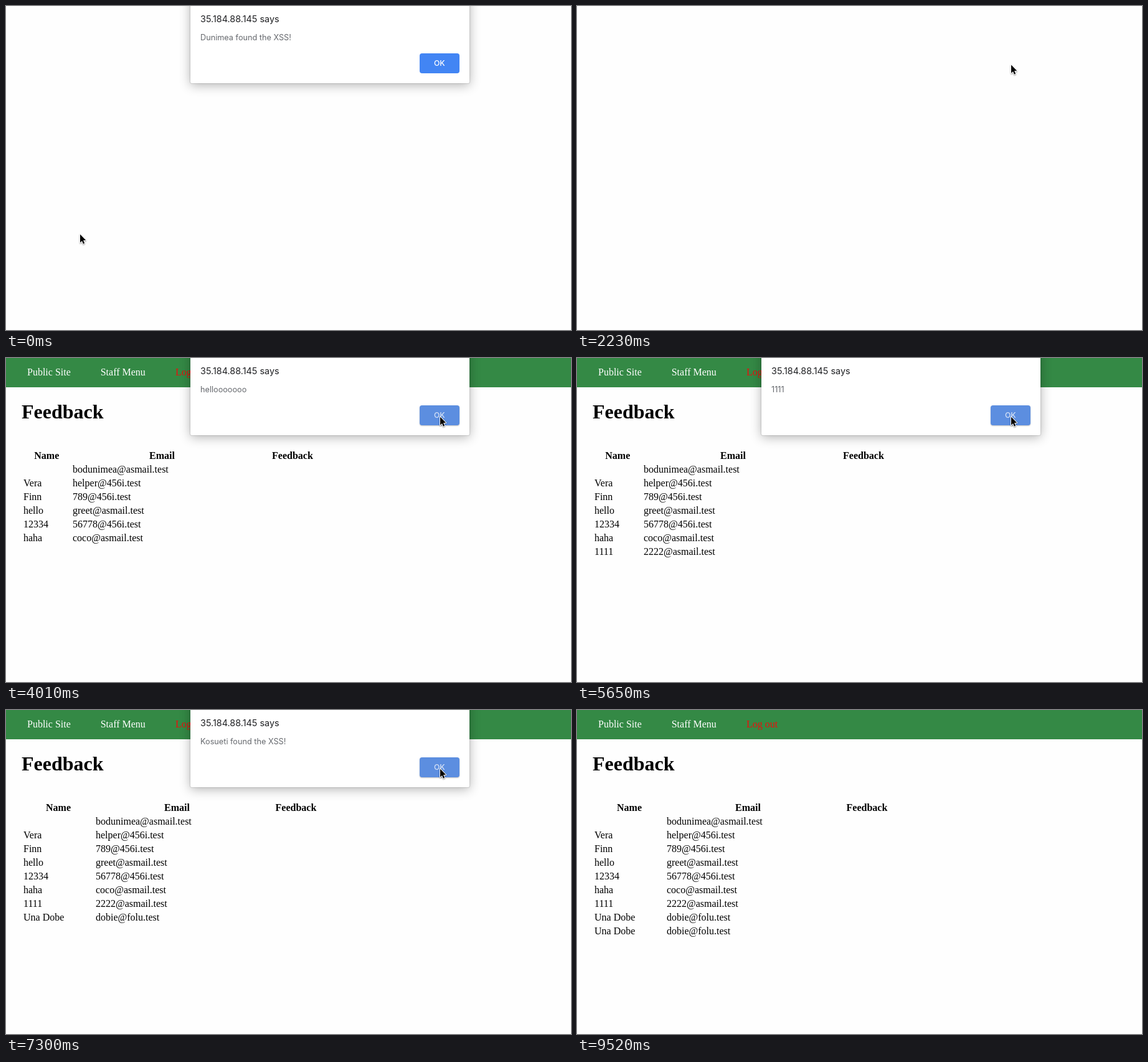
An HTML page with a canvas for the animation above (9670 ms loop, 907 by 520 pixels).

```html
<!DOCTYPE html>
<html lang="en">
<head>
<meta charset="utf-8">
<title>Feedback</title>
<style>
html, body { margin: 0; width: 100%; height: 100%; overflow: hidden; background: #fefefe; }
canvas { display: block; width: 907px; height: 520px; }
</style>
</head>
<body>
<canvas id="stage"></canvas>
<script>
const W = 907, H = 520, LOOP = 9670;
const canvas = document.getElementById('stage');
const ctx = canvas.getContext('2d');
const dpr = window.devicePixelRatio || 1;
canvas.width = W * dpr;
canvas.height = H * dpr;

const SERIF = '"Liberation Serif", serif';
const SANS = 'Inter, sans-serif';

const FOUND = 'Dunimea found the XSS!';
const ROWS = [
  ['', 'bodunimea@asmail.test'],
  ['Vera', 'helper@456i.test'],
  ['Finn', '789@456i.test'],
  ['hello', 'greet@asmail.test'],
  ['12334', '56778@456i.test'],
  ['haha', 'coco@asmail.test'],
  ['1111', '2222@asmail.test'],
  ['Una Dobe', 'dobie@folu.test'],
  ['Una Dobe', 'dobie@folu.test']
];

// start time, table rows (0 = blank page), message, button held, dialog opacity
const SCENES = [
  [0, 0, FOUND, false, 1],
  [1180, 0, FOUND, true, 1],
  [1330, 0, FOUND, true, 0],
  [1480, 0, FOUND, false, 1],
  [2080, 0, FOUND, true, 1],
  [2230, 0, FOUND, true, 0],
  [2370, 1, 'hello', false, 1],
  [2970, 1, 'hello', true, 1],
  [3270, 6, 'hellooooooo', false, 0.88],
  [3420, 6, 'hellooooooo', false, 1],
  [4010, 6, 'hellooooooo', true, 1],
  [4160, 7, '1111', false, 0.88],
  [4310, 7, '1111', false, 1],
  [5650, 7, '1111', true, 1],
  [5800, 8, 'Kosueti found the XSS!', false, 0.88],
  [5950, 8, 'Kosueti found the XSS!', false, 1],
  [7300, 8, 'Kosueti found the XSS!', true, 1],
  [7440, 9, 'Kosueti found the XSS!', true, 0.4],
  [7590, 9, '', false, 0]
];

function text(str, x, y, font, color) {
  ctx.font = font;
  ctx.fillStyle = color;
  ctx.fillText(str, x, y);
}

function box(x, y, w, h, r, color) {
  ctx.beginPath();
  ctx.roundRect(x, y, w, h, r);
  ctx.fillStyle = color;
  ctx.fill();
}

function shadow(color, blur, dy) {
  ctx.shadowColor = color;
  ctx.shadowBlur = blur * dpr;
  ctx.shadowOffsetY = dy * dpr;
}

function noShadow() {
  shadow('transparent', 0, 0);
}

function drawPage(count) {
  const plain = '16px ' + SERIF, bold = 'bold 16px ' + SERIF;
  const wide = count > 7;
  ctx.fillStyle = '#348945';
  ctx.fillRect(0, 0, W, 47);
  text('Public Site', 34, 28, plain, '#fff');
  text('Staff Menu', 151.7, 28, plain, '#fff');
  text('Log out', 272, 28, plain, '#ee0c0c');
  text('Feedback', 25, 97, 'bold 32px ' + SERIF, '#000');
  text('Name', wide ? 64 : 45.3, 162, bold, '#000');
  text('Email', wide ? 254 : 230, 162, bold, '#000');
  text('Feedback', wide ? 432.6 : 427, 162, bold, '#000');
  ROWS.slice(0, count).forEach(([name, mail], i) => {
    const y = 184 + 22 * i;
    text(name, 28, y, plain, '#000');
    text(mail, wide ? 144 : 107, y, plain, '#000');
  });
}

function drawDialog(msg, held, hover, alpha) {
  ctx.save();
  ctx.globalAlpha = alpha;
  shadow('rgba(0,0,0,0.3)', 18, 3);
  box(296, -20, 448, 144, 2, '#fff');
  shadow('rgba(0,0,0,0.5)', 1.5, 0);
  box(296, -20, 448, 144, 2, '#fff');
  noShadow();
  text('35.184.88.145 says', 312, 26, '14.4px ' + SANS, '#202124');
  text(msg, 312, 55, '12.7px ' + SANS, '#66696e');
  if (held) shadow('rgba(0,0,0,0.25)', 2, 1);
  box(664, 76, 64, 32, 4, held ? '#5c8ee0' : hover ? '#3f80e8' : '#4285f4');
  noShadow();
  text('OK', 687, 96.2, '500 12.2px ' + SANS, held ? '#d6e2f6' : '#fff');
  ctx.restore();
}

function drawCursor(x, y) {
  ctx.save();
  ctx.translate(x, y);
  ctx.beginPath();
  ctx.moveTo(0, 0);
  ctx.lineTo(0, 13.2);
  ctx.lineTo(3, 10.4);
  ctx.lineTo(5, 15.2);
  ctx.lineTo(7.1, 14.3);
  ctx.lineTo(5.1, 9.6);
  ctx.lineTo(9.2, 9.6);
  ctx.closePath();
  ctx.lineWidth = 2;
  ctx.lineJoin = 'round';
  ctx.strokeStyle = '#fff';
  shadow('rgba(0,0,0,0.4)', 2, 1);
  ctx.stroke();
  noShadow();
  ctx.fillStyle = '#000';
  ctx.fill();
  ctx.restore();
}

const ease = p => p * p * (3 - 2 * p);

function stepped(t, start, step, count) {
  const k = Math.floor((t - start) / step) + 1;
  return ease(Math.min(Math.max(k / count, 0), 1));
}

function draw(t) {
  const scene = SCENES.filter(s => s[0] <= t).pop();
  const [, count, msg, held, alpha] = scene;
  const enter = stepped(t, 290, 148.5, 6);
  const leave = stepped(t, 8630, 148.3, 7);

  ctx.setTransform(dpr, 0, 0, dpr, 0, 0);
  ctx.fillStyle = '#fefefe';
  ctx.fillRect(0, 0, W, H);
  if (count) drawPage(count);
  if (alpha) drawDialog(msg, held, enter === 1, alpha);
  if (leave < 1) {
    drawCursor(119 + 578 * enter + 200 * leave, 366.5 - 272 * enter + 430 * leave);
  }
}

let begin = null;
function tick(now) {
  if (begin === null) begin = now;
  draw((now - begin) % LOOP);
  requestAnimationFrame(tick);
}
draw(0);
requestAnimationFrame(tick);
</script>
</body>
</html>
```
